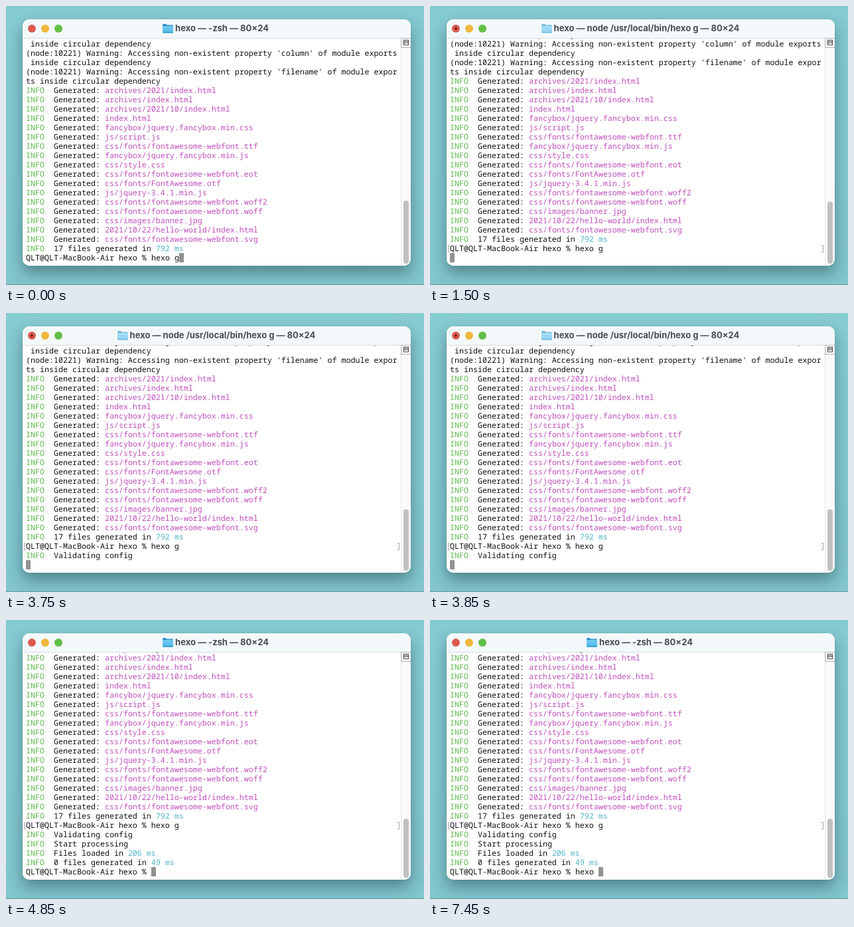
An HTML page for the animation above (8000 ms loop, 630 by 420 pixels).

```html
<!DOCTYPE html>
<html lang="en">
<head>
<meta charset="utf-8">
<title>Terminal</title>
<style>
html, body { margin: 0; width: 100%; height: 100%; overflow: hidden; background: #85c9d1; }
#stage { position: relative; width: 630px; height: 420px; overflow: hidden;
  background: linear-gradient(#86cad2, #82c5cd); }
#stage::after { content: ""; position: absolute; left: 0; right: 0; bottom: 0; height: 1px; background: #64979e; }
#shadow { position: absolute; left: 25px; top: 20px; width: 585px; height: 371px; border-radius: 10px;
  box-shadow: 0 0 1px rgba(0, 0, 0, .35), 0 11px 22px rgba(0, 30, 36, .38); }

svg { position: absolute; left: 0; top: 0;
  --n: 0; --col: 33; --prompt: 1; --hexo: 1; --g: 1; --node: 0;
  animation: session 8s step-end -20ms infinite; }

/* n: lines scrolled, col: cursor column, the rest are on/off */
@keyframes session {
  0%      { --n: 0; --col: 33; --prompt: 1; --hexo: 1; --g: 1; --node: 0; }
  7.5%    { --n: 1; --col: 0; --prompt: 0; --hexo: 0; --g: 0; }
  9.375%  { --node: 1; }
  46.875% { --n: 2; }
  55%     { --n: 3; }
  56.875% { --n: 4; }
  57.5%   { --n: 5; }
  58.125% { --prompt: 1; --col: 27; }
  59.375% { --node: 0; }
  68.125% { --hexo: 1; --g: 1; --col: 33; }
  93.125% { --g: 0; --col: 32; }
  100%    { --n: 5; --col: 32; --prompt: 1; --hexo: 1; --g: 0; --node: 0; }
}

text { white-space: pre; }
.mono { font: 500 11.667px "Noto Sans Mono", "DejaVu Sans Mono", monospace;
  text-rendering: geometricPrecision; fill: #111; }
.title { font: 700 13px Inter, Roboto, sans-serif; fill: #484c4d; text-anchor: middle; }
.info { fill: #5dba4b; }
.path { fill: #c04fbd; }
.time { fill: #4fb5c8; }
.mark { fill: none; stroke: #a2a2a2; }

#log { transform: translateY(calc(var(--n) * -14px)); }
#cursor { transform: translateX(calc(var(--col) * 7px)); }
#thumb { y: calc(293px + var(--n) * 1.2px); height: calc(95px - var(--n) * 1.2px); }
#prompt { opacity: var(--prompt); }
#hexo { opacity: var(--hexo); }
#g { opacity: var(--g); }
.busy { opacity: var(--node); }
.idle { opacity: calc(1 - var(--node)); }
</style>
</head>
<body>
<div id="stage">
  <div id="shadow"></div>
  <svg width="630" height="420" viewBox="0 0 630 420">
    <defs>
      <clipPath id="win"><rect x="25" y="20" width="585" height="371" rx="10"/></clipPath>
      <clipPath id="rows"><rect x="25" y="49" width="570" height="323"/></clipPath>
      <linearGradient id="front" x2="0" y2="1">
        <stop stop-color="#74cdf6"/><stop offset="1" stop-color="#4fb2e4"/>
      </linearGradient>
      <g id="folder">
        <path d="M0 2.5Q0 1 1.5 1H5l1.6 1.5h7.9Q16 2.5 16 4v8H0Z" fill="#2f93cb"/>
        <rect y="4" width="16" height="11" rx="1.3" fill="url(#front)"/>
        <path d="M1 13.5H15" stroke="#3a9fd4"/>
      </g>
    </defs>

    <g clip-path="url(#win)">
      <rect x="25" y="20" width="585" height="371" fill="#fff"/>
      <rect x="25" y="20" width="585" height="28" fill="#f3f9fa"/>
      <rect x="25" y="48" width="585" height="1" fill="#d6dddf"/>
      <rect x="595" y="49" width="15" height="342" fill="#fafafa"/>
      <path d="M595.5 49V391" stroke="#e4e4e4"/>
      <rect x="595.5" y="48.5" width="15" height="14" fill="#f4f4f4" stroke="#b4b4b4"/>
      <rect x="599.5" y="51.5" width="7" height="7" fill="#fff" stroke="#4c4c4c"/>
      <path d="M600 53.5h6M600 55.5h6" stroke="#4c4c4c"/>
      <rect id="thumb" x="599" width="8" rx="4" fill="#c0c0c0"/>
    </g>

    <circle cx="39" cy="34" r="6" fill="#dc5a50"/>
    <circle cx="59" cy="34" r="6" fill="#f1b73d"/>
    <circle cx="79" cy="34" r="6" fill="#62bf46"/>
    <circle class="busy" cx="39" cy="34" r="2" fill="#74160f"/>

    <g class="idle">
      <use href="#folder" x="236" y="26"/>
      <text class="title" x="325.5" y="38">hexo — -zsh — 80×24</text>
    </g>
    <g class="busy">
      <use href="#folder" x="168" y="26" opacity=".6"/>
      <text class="title" x="326.5" y="38">hexo — node /usr/local/bin/hexo g — 80×24</text>
    </g>

    <g clip-path="url(#rows)"><g id="log" class="mono"></g></g>

    <g class="mono">
      <text id="prompt" x="30" y="383"></text>
      <text id="hexo" x="219" y="383">hexo </text>
      <text id="g" x="254" y="383">g</text>
    </g>
    <rect id="cursor" x="30" y="372" width="7" height="14" fill="#919191"/>
  </svg>
</div>

<script>
const NS = "http://www.w3.org/2000/svg";
const log = document.getElementById("log");
const prompt = "QLT@QLT-MacBook-Air hexo % ";

function add(parent, tag, attrs, content = "") {
  const el = document.createElementNS(NS, tag);
  for (const key in attrs) el.setAttribute(key, attrs[key]);
  el.textContent = content;
  return parent.appendChild(el);
}

const info = (text, tail = "", kind = "time") =>
  [["info", "INFO"], ["", "  " + text], [kind, tail]];
const warning = (name, end) =>
  `(node:10221) Warning: Accessing non-existent property '${name}' of module ${end}`;

const files = `archives/2021/index.html
archives/index.html
archives/2021/10/index.html
index.html
fancybox/jquery.fancybox.min.css
js/script.js
css/fonts/fontawesome-webfont.ttf
fancybox/jquery.fancybox.min.js
css/style.css
css/fonts/fontawesome-webfont.eot
css/fonts/FontAwesome.otf
js/jquery-3.4.1.min.js
css/fonts/fontawesome-webfont.woff2
css/fonts/fontawesome-webfont.woff
css/images/banner.jpg
2021/10/22/hello-world/index.html
css/fonts/fontawesome-webfont.svg`.split("\n");

const lines = [
  " inside circular dependency",
  warning("column", "exports"),
  " inside circular dependency",
  warning("filename", "expor"),
  "ts inside circular dependency",
  ...files.map(file => info("Generated: ", file, "path")),
  info("17 files generated in ", "792 ms"),
  prompt + "hexo g",
  info("Validating config"),
  info("Start processing"),
  info("Files loaded in ", "206 ms"),
  info("0 files generated in ", "49 ms")
];

lines.forEach((line, row) => {
  const top = 50 + row * 14;
  const text = add(log, "text", { x: 30, y: top + 11 });
  const parts = typeof line === "string" ? [["", line]] : line;
  for (const [kind, part] of parts) add(text, "tspan", { class: kind }, part);
  if (line === prompt + "hexo g") {
    add(log, "path", { class: "mark", d: `M29.5 ${top + 2.5}h-2v10h2M590 ${top + 2.5}h2.5v10h-2.5` });
  }
});

document.getElementById("prompt").textContent = prompt;
</script>
</body>
</html>
```
